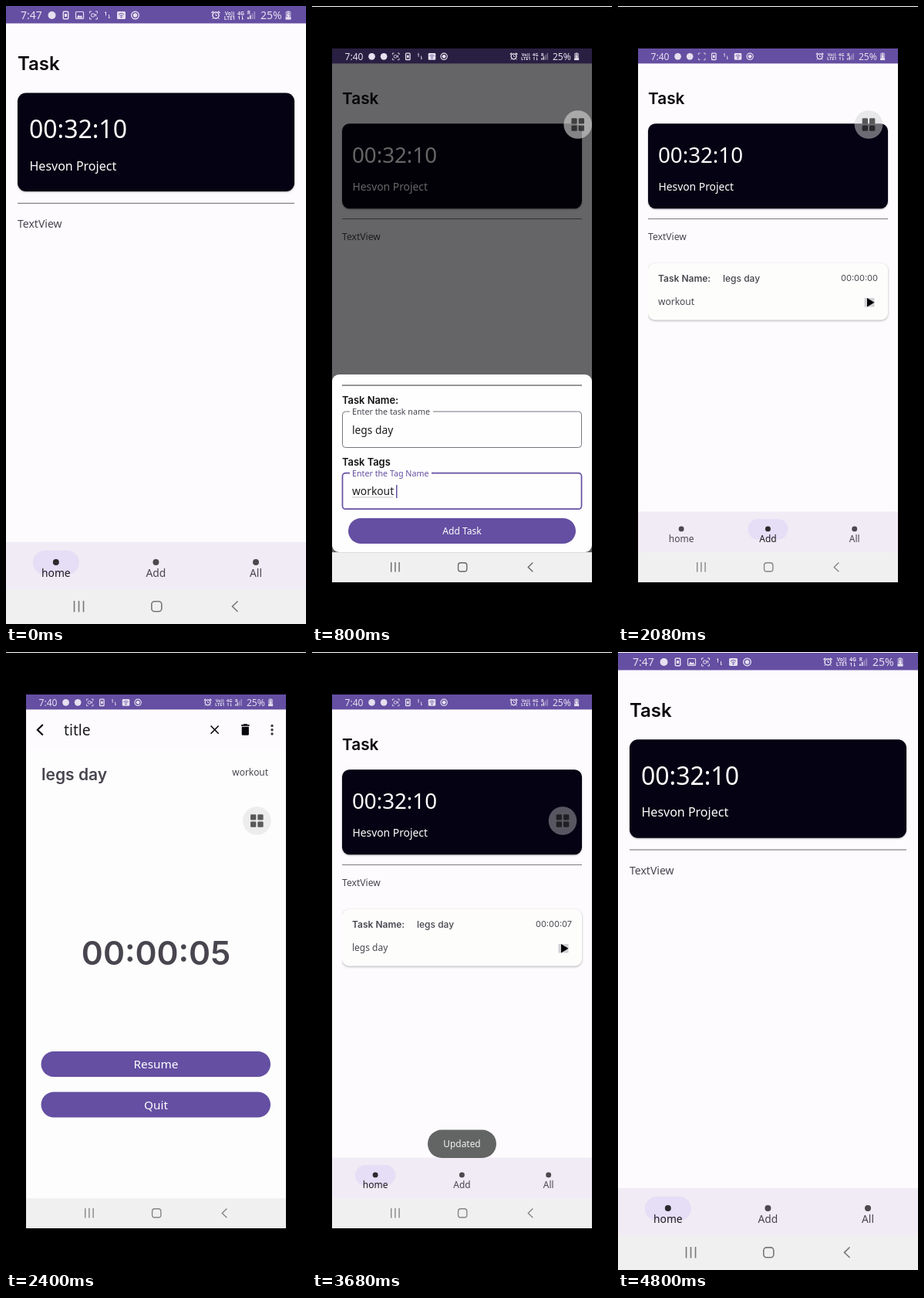
An HTML page with a canvas for the animation above (5600 ms loop, 389x800 px).

```html
<!DOCTYPE html>
<html lang="en">
<head>
<meta charset="utf-8">
<title>Task timer</title>
<style>
html, body { margin: 0; width: 100%; height: 100%; overflow: hidden; background: #000; }
canvas { display: block; width: 389px; height: 800px; }
</style>
</head>
<body>
<canvas id="stage"></canvas>
<script>
const W = 389, H = 800, HOLD = 800;
const PURPLE = '#644fa2', INK = '#1c1b1f', GREY = '#49454f', PAPER = '#fefbff', NIGHT = '#050213';
const SANS = '"Noto Sans", sans-serif', HEAD = 'Inter, sans-serif';
const canvas = document.getElementById('stage');
const ctx = canvas.getContext('2d');
const ratio = window.devicePixelRatio || 1;
canvas.width = W * ratio;
canvas.height = H * ratio;

function rect(x, y, w, h, color) {
  ctx.fillStyle = color;
  ctx.fillRect(x, y, w, h);
}

function round(x, y, w, h, r, color) {
  ctx.beginPath();
  ctx.roundRect(x, y, w, h, r);
  ctx.fillStyle = color;
  ctx.fill();
}

function outline(x, y, w, h, r, color, width = 1) {
  ctx.beginPath();
  ctx.roundRect(x, y, w, h, r);
  ctx.strokeStyle = color;
  ctx.lineWidth = width;
  ctx.stroke();
}

function dot(x, y, r, color) {
  ctx.beginPath();
  ctx.arc(x, y, r, 0, Math.PI * 2);
  ctx.fillStyle = color;
  ctx.fill();
}

function line(points, color, width = 1) {
  ctx.beginPath();
  points.forEach(([x, y], i) => i ? ctx.lineTo(x, y) : ctx.moveTo(x, y));
  ctx.strokeStyle = color;
  ctx.lineWidth = width;
  ctx.stroke();
}

function text(str, x, y, size, color, { font = SANS, weight = 400, align = 'left' } = {}) {
  ctx.font = `${weight} ${size}px ${font}`;
  ctx.textAlign = align;
  ctx.fillStyle = color;
  ctx.fillText(str, x, y);
}

function withShadow(color, blur, dy, draw) {
  ctx.save();
  ctx.shadowColor = color;
  ctx.shadowBlur = blur * ratio;
  ctx.shadowOffsetY = dy * ratio;
  draw();
  ctx.restore();
}

// Status bar icons, each centred on x in a 22 px bar
const LIGHT = '#e6e0f0';
const icons = {
  app: x => dot(x, 12, 5, LIGHT),
  phone(x) {
    outline(x - 3.2, 7.2, 6.4, 9.6, 1, LIGHT, 1.5);
    rect(x - 1.5, 10, 3, 4, LIGHT);
  },
  image(x) {
    outline(x - 5, 7.5, 10, 9, 1, LIGHT, 1.2);
    ctx.beginPath();
    ctx.moveTo(x - 4, 15.5);
    ctx.lineTo(x - 1.5, 11.5);
    ctx.lineTo(x + 0.5, 13.5);
    ctx.lineTo(x + 2, 12);
    ctx.lineTo(x + 4, 15.5);
    ctx.fillStyle = LIGHT;
    ctx.fill();
  },
  corners(x) {
    for (const sx of [-1, 1]) for (const sy of [-1, 1])
      line([[x + sx * 5, 12 + sy * 2.5], [x + sx * 5, 12 + sy * 5], [x + sx * 2.5, 12 + sy * 5]], LIGHT);
  },
  capture(x) {
    icons.corners(x);
    outline(x - 2.8, 10, 4, 4, 1, LIGHT);
    line([[x + 1.5, 12], [x + 3.2, 10.5], [x + 3.2, 13.5]], LIGHT);
  },
  arrows(x) {
    line([[x - 3.5, 9], [x - 2, 7.5], [x - 2, 12.5]], LIGHT);
    line([[x + 3.5, 14.5], [x + 2, 16], [x + 2, 11]], LIGHT);
  },
  wifi(x) {
    round(x - 5.5, 7, 11, 10, 1.5, LIGHT);
    for (const r of [3, 5.3]) {
      ctx.beginPath();
      ctx.arc(x, 15, r, -2.3, -0.84);
      ctx.strokeStyle = PURPLE;
      ctx.lineWidth = 1;
      ctx.stroke();
    }
    dot(x, 14.5, 1, PURPLE);
  },
  record(x) {
    dot(x, 12, 2.7, LIGHT);
    outline(x - 4.8, 7.2, 9.6, 9.6, 4.8, LIGHT, 1.4);
  }
};

function statusBar(time, names, bg) {
  rect(0, 0, W, 22.5, bg);
  text(time, 19, 17, 14, LIGHT);
  names.forEach((name, i) => icons[name](59.5 + i * 18, 12));

  outline(268, 8, 8, 8, 4, LIGHT, 1.6);
  line([[272, 9.5], [272, 12.3], [274, 12.3]], LIGHT);
  line([[266.5, 9], [269, 6.8]], LIGHT, 1.6);
  line([[277.5, 9], [275, 6.8]], LIGHT, 1.6);
  line([[268.5, 15.5], [267.5, 17]], LIGHT);
  line([[275.5, 15.5], [276.5, 17]], LIGHT);
  const bold = { weight: 600, align: 'center' };
  text('Vo))', 290, 11.5, 6.5, LIGHT, bold);
  text('LTE1', 290, 17.5, 6.5, LIGHT, bold);
  text('4G', 304.5, 11.5, 7, LIGHT, bold);
  line([[301.3, 14.5], [302.5, 13], [302.5, 17.5]], LIGHT);
  line([[307.7, 16], [306.5, 17.5], [306.5, 13]], LIGHT);
  text('R', 315, 11, 6.5, LIGHT, bold);
  for (let i = 0; i < 4; i++)
    rect(313 + i * 2.8, 14.5 - i * 2.5, 1.8, 2.5 + i * 2.5, i < 2 ? LIGHT : 'rgba(230,224,240,.4)');
  text('25%', 330, 17, 14, LIGHT);
  round(364.3, 6, 3.4, 2, 0.5, 'rgba(230,224,240,.55)');
  round(362.5, 7, 7, 10.5, 1, 'rgba(230,224,240,.55)');
  rect(362.5, 14.5, 7, 3, LIGHT);
  line([[366.6, 9], [364.8, 12.3], [367.2, 12.3], [365.4, 15.5]], '#fff');
}

function systemBar(color = '#858585') {
  rect(0, 755, W, 45, '#f0f0f0');
  for (const x of [88.5, 94.5, 100.5]) line([[x, 770], [x, 784.5]], color, 1.6);
  outline(188.8, 770.8, 13, 13, 3.8, color, 1.6);
  line([[300.5, 770.5], [293.5, 777.3], [300.5, 784]], color, 1.6);
}

function tabBar(active) {
  rect(0, 694, W, 61, '#f0ebf4');
  ['home', 'Add', 'All'].forEach((label, i) => {
    const x = 64.8 + i * 129.6, on = i === active;
    if (on) round(x - 30, 705, 60, 31, 15.5, '#e6ddf7');
    dot(x, 720, 4, on ? '#2b2a2e' : '#4b494e');
    text(label, x, 739.3, 13.8, on ? INK : GREY, { align: 'center' });
  });
}

function home(active) {
  rect(0, 0, W, H, PAPER);
  text('Task', 15, 83, 24, '#08070c', { font: HEAD, weight: 600 });
  withShadow('rgba(0,0,0,.3)', 2, 1, () => round(15, 112.5, 359, 127.5, 11, NIGHT));
  text('00:32:10', 30, 171, 32, '#fff');
  text('Hesvon Project', 30.5, 212.7, 16, '#fff');
  rect(15, 254.8, 359, 1.1, '#77737a');
  text('TextView', 15, 287.3, 14, GREY);
  tabBar(active);
}

const FULL_ICONS = ['app', 'phone', 'image', 'capture', 'arrows', 'wifi', 'record'];

function fullScreen(top) {
  ctx.save();
  rect(0, 0, W, H, '#fff');
  ctx.translate(0, top);
  ctx.scale(1, (H - top) / H);
  home(0);
  statusBar('7:47', FULL_ICONS, PURPLE);
  systemBar('#777');
  ctx.restore();
}

// Draws in phone units inside the inset screen
function inset(draw) {
  ctx.save();
  ctx.beginPath();
  ctx.rect(26, 55, 337, 691);
  ctx.clip();
  ctx.translate(26, 55);
  ctx.scale(337 / W, 691 / H);
  draw();
  ctx.restore();
}

function smallStatus(bg = PURPLE, third = 'capture') {
  statusBar('7:40', ['app', 'app', third, 'phone', 'arrows', 'wifi', 'record'], bg);
}

function insetHome(active, third) {
  rect(0, 0, W, H, '#000');
  rect(0, 0, W, 1, '#fff');
  inset(() => {
    home(active);
    smallStatus(PURPLE, third);
    systemBar();
  });
}

function gridButton(x, y, alpha) {
  dot(x, y, 18.3, `rgba(212,212,212,${alpha})`);
  for (const dx of [-8.3, 1]) for (const dy of [-8.3, 1])
    round(x + dx, y + dy, 7.3, 7.3, 1.2, 'rgba(0,0,0,.62)');
}

function trash(x, y, s = 1) {
  rect(x - 5.3 * s, y - 6.3 * s, 10.6 * s, 1.7 * s, '#08070c');
  rect(x - 2.5 * s, y - 7.3 * s, 5 * s, 1.5 * s, '#08070c');
  round(x - 4.6 * s, y - 3.6 * s, 9.2 * s, 11 * s, [0, 0, 1.5, 1.5], '#08070c');
}

function taskCard(time, tag, shift = 0) {
  ctx.save();
  ctx.beginPath();
  ctx.rect(39, 325, 313, 90);
  ctx.clip();
  ctx.translate(-shift, 0);
  withShadow('rgba(0,0,0,.3)', 3, 1, () => round(39, 333, 311, 73.5, 9, '#fdfefc'));
  text('Task Name:', 52, 356.7, 12, GREY, { font: HEAD, weight: 600 });
  text('legs day', 136, 356.7, 12, GREY, { font: HEAD, weight: 500 });
  text(time, 337, 355.7, 11, GREY, { font: HEAD, align: 'right' });
  text(tag, 52, 387, 12, GREY);
  rect(319.5, 378, 13, 11.5, '#d2d1d6');
  ctx.beginPath();
  ctx.moveTo(323, 378);
  ctx.lineTo(332.5, 383.7);
  ctx.lineTo(323, 389.5);
  ctx.fillStyle = '#000';
  ctx.fill();
  ctx.restore();
}

function pillButton(label, x, y, w, size) {
  round(x, y, w, 33, 16.5, PURPLE);
  text(label, 194.5, y + 16.5 + size * 0.36, size, '#fff', { align: 'center' });
}

function field(label, value, y, color, width, gapEnd) {
  outline(39.5, y, 310, 46.5, 4, color, width);
  rect(49, y - 2, gapEnd - 49, 4, '#fefefe');
  text(label, 52, y + 4, 10.7, color === PURPLE ? PURPLE : GREY);
  text(value, 52, y + 28.7, 13.8, INK);
}

function addSheet() {
  rect(0, 0, W, H, '#000');
  rect(0, 0, W, 1, '#fff');
  inset(() => {
    home(1);
    rect(0, 0, W, H, 'rgba(0,0,0,.6)');
    smallStatus('#281f42');
  });
  gridButton(344.7, 153.5, 0.62);
  round(26, 477, 337, 230, 9, '#fefefe');
  inset(() => systemBar('#666'));

  rect(39, 490.3, 311, 1.5, '#777');
  const title = { font: HEAD, weight: 600 };
  text('Task Name:', 39, 515, 12.9, '#111', title);
  field('Enter the task name', 'legs day', 525, '#79747e', 1, 157);
  text('Task Tags', 39, 595, 12.9, '#111', title);
  field('Enter the Tag Name', 'workout', 604.7, PURPLE, 1.7, 155);
  rect(52, 635.5, 53, 0.8, '#b8b6bb');
  rect(109, 620, 1.5, 17, PURPLE);
  pillButton('Add Task', 47, 663, 295, 12.1);
}

function taskAdded() {
  insetHome(1, 'corners');
  gridButton(325, 153.5, 0.5);
  taskCard('00:00:00', 'workout');
}

function timer() {
  rect(0, 0, W, H, '#000');
  rect(0, 0, W, 1, '#fff');
  inset(() => {
    rect(0, 0, W, H, '#fdfdfd');
    rect(0, 22, W, 61.5, PAPER);
    smallStatus();
    systemBar();
  });
  line([[47.8, 94], [40.8, 100.8], [47.8, 107.6]], '#08070c', 2.1);
  text('title', 75, 108.3, 19.2, INK);
  line([[265.5, 95.5], [275.7, 105.7]], '#08070c', 1.6);
  line([[275.7, 95.5], [265.5, 105.7]], '#08070c', 1.6);
  trash(310.3, 100.4);
  for (const dy of [-5.3, 0, 5.3]) dot(345, 100.7 + dy, 1.7, '#3a383d');
  text('legs day', 46, 166, 21, GREY, { font: HEAD, weight: 600 });
  text('workout', 340, 160, 11.9, GREY, { align: 'right' });
  gridButton(325.3, 218.5, 0.4);
  text('00:00:05', 194.5, 405, 42.5, GREY, { font: HEAD, weight: 600, align: 'center' });
  pillButton('Resume', 45.5, 517, 297.5, 15.3);
  pillButton('Quit', 45.5, 569.5, 297.5, 15.3);
}

function updated() {
  insetHome(0);
  gridButton(325, 218.5, 0.4);
  taskCard('00:00:07', 'legs day');
  round(150, 618.5, 89, 36.5, 18.2, '#636464');
  text('Updated', 194.5, 641, 11.9, '#f2f2f2', { align: 'center' });
}

function swiped() {
  insetHome(0);
  gridButton(325, 218.5, 0.4);
  taskCard('00:00:07', 'legs day', 174.3);
  trash(327, 366.5, 1.05);
}

const scenes = [() => fullScreen(0), addSheet, taskAdded, timer, updated, swiped, () => fullScreen(1)];

function render() {
  const index = Math.floor(performance.now() / HOLD) % scenes.length;
  ctx.setTransform(ratio, 0, 0, ratio, 0, 0);
  scenes[index]();
  requestAnimationFrame(render);
}
render();
</script>
</body>
</html>
```
